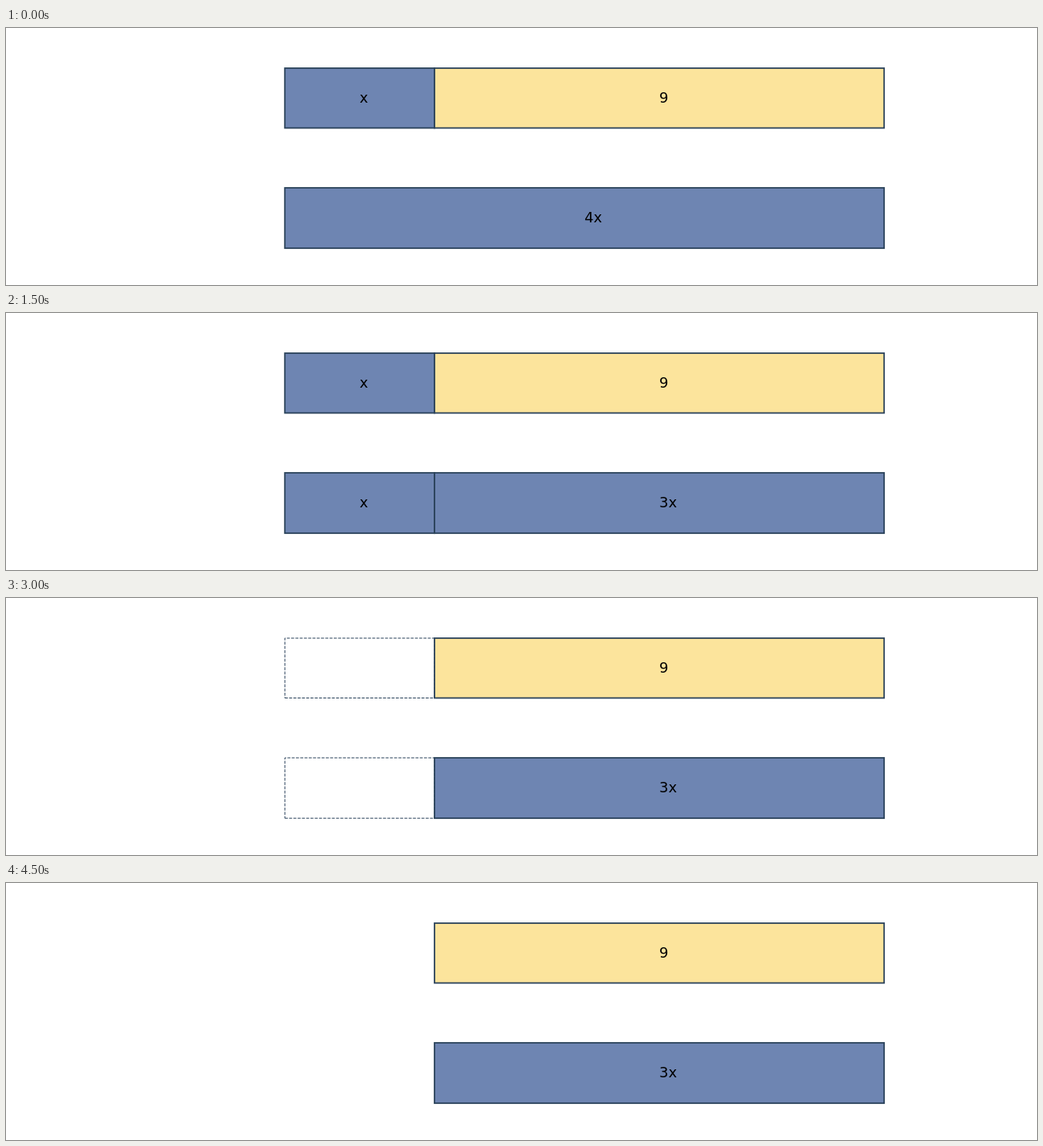
Write an HTML page that moves like this. It is 1280 px wide and 320 px high and loops after 6000 ms.

```html
<!DOCTYPE html>
<html lang="en">
<head>
<meta charset="utf-8">
<title>Solving x + 9 = 4x with bars</title>
<style>
  html, body { margin: 0; width: 100%; height: 100%; overflow: hidden; background: #fff; }
  svg { display: block; width: 1280px; height: 320px; }
  text { font: 17.78px "DejaVu Sans", sans-serif; fill: #000; }
</style>
</head>
<body>
<svg id="stage" viewBox="0 0 1280 320"></svg>
<script>
const stage = document.getElementById('stage');
const BLUE = '#6e85b2', YELLOW = '#fce49c', EDGE = '#2a425a';
const LEFT = 346.2, SPLIT = 532, RIGHT = 1090.2;
const STEP = 1500;
const rows = [
  { top: 50, bottom: 124.5, base: 93 },
  { top: 199, bottom: 274.2, base: 242 }
];

// Labels start at the middle of their bar.
function bar(row, x0, x1, fill, label) {
  const { top, bottom, base } = rows[row];
  return `<rect x="${x0}" y="${top}" width="${x1 - x0}" height="${bottom - top}"
    fill="${fill}" stroke="${EDGE}" stroke-width="1.78"/>
    <text x="${(x0 + x1) / 2}" y="${base}">${label}</text>`;
}

function ghost(row) {
  const { top, bottom } = rows[row];
  return `<path d="M${LEFT} ${bottom}H${SPLIT}V${top}H${LEFT}Z" fill="none"
    stroke="${EDGE}" stroke-width="1" stroke-dasharray="3.7 1.6"/>`;
}

const unit = row => bar(row, LEFT, SPLIT, BLUE, 'x');
const nine = bar(0, SPLIT, RIGHT, YELLOW, '9');
const three = bar(1, SPLIT, RIGHT, BLUE, '3x');
const scenes = [
  unit(0) + nine + bar(1, LEFT, RIGHT, BLUE, '4x'),
  unit(0) + nine + unit(1) + three,
  ghost(0) + ghost(1) + nine + three,
  nine + three
];

let shown = -1;
function draw(ms) {
  const i = Math.floor(ms / STEP) % scenes.length;
  if (i === shown) return;
  shown = i;
  stage.innerHTML = scenes[i];
}

const start = performance.now();
function tick() {
  draw(performance.now() - start);
  requestAnimationFrame(tick);
}
tick();
</script>
</body>
</html>
```
